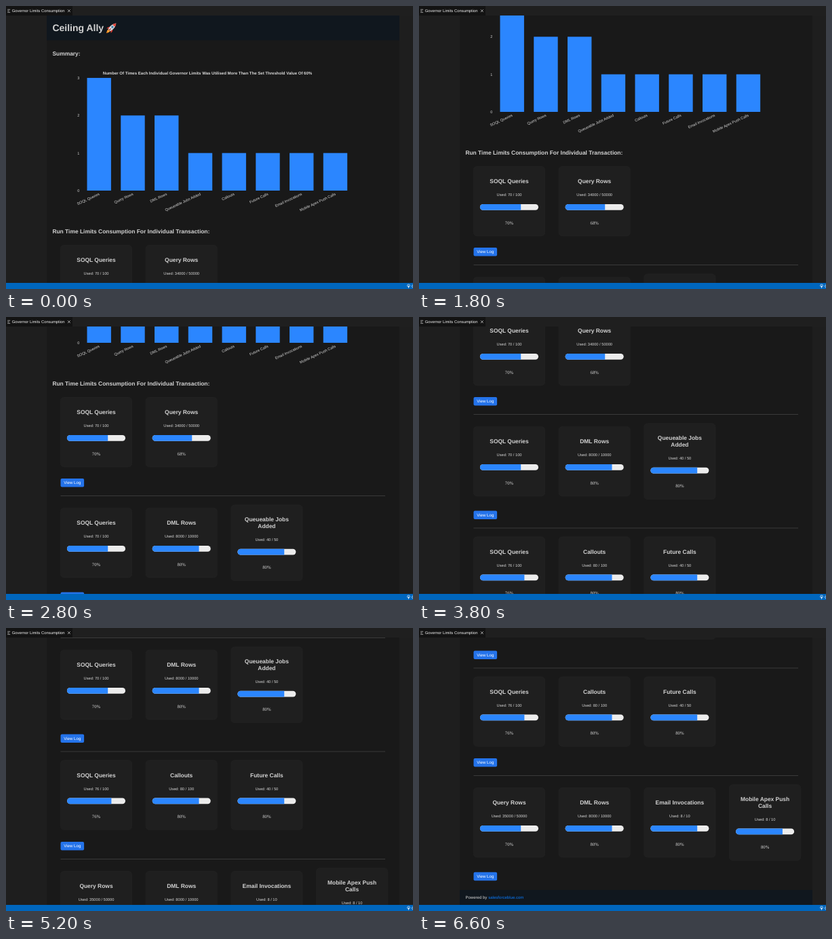
An HTML page for the animation above (6700 ms loop, 600x417 px).

```html
<!DOCTYPE html>
<html lang="en">
<head>
<meta charset="utf-8">
<title>Governor Limits Consumption</title>
<style>
  html, body { margin: 0; width: 100%; height: 100%; overflow: hidden; background: #1e1e1e; }
  svg { display: block; width: 600px; height: 417px; }
  text { font-family: "Liberation Sans", Arial, Helvetica, sans-serif; fill: #d8d8d8; text-rendering: geometricPrecision; }
  .h { font-weight: bold; font-size: 8.43px; fill: #d2d2d2; }
  .used { font-size: 5.68px; }
  .pct { font-family: "Liberation Serif", "Times New Roman", serif; font-size: 6.7px; }
  .tick { font-size: 5.5px; }
  .mid { text-anchor: middle; }
  .end { text-anchor: end; }
</style>
</head>
<body>
<svg id="stage" viewBox="0 0 600 417">
  <rect width="600" height="417" fill="#1e1e1e"/>
  <rect x="60" y="14" width="520" height="394" fill="#191919"/>
  <g id="page"></g>
  <g id="tabs">
    <rect width="600" height="14" fill="#1f1f1f"/>
    <rect width="98" height="14" fill="#131313"/>
    <path d="M2.2 5.2h4M2.2 7.3h2.6M2.2 9.4h4" stroke="#c4c4c4" stroke-width=".8"/>
    <text x="8.7" y="9.3" font-size="5.9" style="fill:#f2f2f2">Governor Limits Consumption</text>
    <path d="M91 5.2l3.8 3.8M94.800 5.2l-3.800 3.800" stroke="#dcdcdc" stroke-width=".7"/>
  </g>
  <g id="status" fill="none" stroke="#e4eefa" stroke-width=".7">
    <rect y="408" width="600" height="9" fill="#0066bd" stroke="none"/>
    <circle cx="593.5" cy="412" r="1.9"/>
    <path d="M593.500 412v3.500" stroke-width="1.100"/>
    <circle cx="600.300" cy="412.800" r="1.900"/>
  </g>
</svg>
<script>
const NS = "http://www.w3.org/2000/svg";
const BLUE = "#2b86ff", LOOP = 6700, STEP = 100;
const page = document.getElementById("page");

function add(tag, attrs, parent = page) {
  const el = document.createElementNS(NS, tag);
  for (const k in attrs) el.setAttribute(k, attrs[k]);
  parent.appendChild(el);
  return el;
}
const rect = (x, y, width, height, fill, more) =>
  add("rect", { x, y, width, height, fill, ...more });
const text = (str, x, y, cls, more) =>
  add("text", { x, y, class: cls, ...more }).textContent = str;

function rocket(x, y) {
  const g = add("g", { transform: `translate(${x} ${y}) rotate(45)` });
  const path = (d, fill) => add("path", { d, fill }, g);
  path("M-2 4Q-2.600 7.500 0 11Q2.600 7.500 2 4Z", "#f58a1f");
  path("M-1 4Q-1.200 6.500 0 8.500Q1.200 6.500 1 4Z", "#ffd65a");
  path("M-2.500 0Q-5 2-4.600 6L-2 4ZM2.500 0Q5 2 4.600 6L2 4Z", "#d8392f");
  path("M0-9.500Q3.600-5 2.900 1L2.100 4.600H-2.100L-2.900 1Q-3.600-5 0-9.500Z", "#d3dbe2");
  path("M0-9.500Q1.900-7.300 2.600-4.800Q0-4-2.600-4.800Q-1.900-7.300 0-9.500Z", "#e0483c");
  add("circle", { cx: 0, cy: -1.8, r: 1.5, fill: "#3d86b8", stroke: "#6b7a86", "stroke-width": .5 }, g);
  path("M-.6 1.500H.6V6H-.6Z", "#b92f28");
}

function chart() {
  text("Number Of Times Each Individual Governor Limits Was Utilised More Than The Set Threshold Value Of 60%",
    297, 100.6, "mid", { "font-weight": "bold", "font-size": 6.05 });
  const base = 272, unit = 55.35;
  for (let n = 0; n < 4; n++) text(n, 108.3, base + 2 - n * unit, "tick end");
  const bars = [["SOQL Queries", 3], ["Query Rows", 2], ["DML Rows", 2], ["Queueable Jobs Added", 1],
    ["Callouts", 1], ["Future Calls", 1], ["Email Invocations", 1], ["Mobile Apex Push Calls", 1]];
  bars.forEach(([name, n], i) => {
    const x = 119.5 + i * 49.75;
    rect(x, base - n * unit, 35.4, n * unit, BLUE);
    text(name, 0, 0, "tick end", { transform: `translate(${x + 18.7} 278.4) rotate(-25)` });
  });
}

function card(col, top, [name, used, total]) {
  const lines = name.split("|"), extra = (lines.length - 1) * 9.3;
  const x = 80.4 + col * 125.7, y = top - extra / 2, cx = x + 52.6;
  rect(x, y, 105.2, 102.3 + extra, "#1f1f1f", { rx: 5, stroke: "#252525", "stroke-width": .6 });
  lines.forEach((s, i) => text(s, cx, y + 24.5 + i * 9.6, "h mid"));
  const o = y + extra, share = used / total;
  text(`Used: ${used} / ${total}`, cx, o + 43.8, "used mid");
  rect(x + 9.6, o + 55.4, 86, 8.8, "#ececec", { rx: 4.4 });
  const w = 86 * share - 4.4;
  add("path", { d: `M${x + 14} ${o + 55.4}h${w}v8.8h${-w}a4.4 4.4 0 0 1 0-8.8z`, fill: BLUE });
  text(Math.round(share * 100) + "%", cx, o + 85.2, "pct mid");
}

function group(top, button, cards) {
  cards.forEach((c, i) => card(i, top, c));
  rect(80.5, button - 6.2, 34.6, 12.4, "#2473ea", { rx: 2 });
  text("View Log", 97.8, button + 2.2, "mid", { "font-size": 6.15, style: "fill:#fff" });
}

function build() {
  rect(60, 14, 520, 36.5, "#10171e");
  text("Ceiling Ally", 68.4, 37.3, "", { "font-weight": "bold", "font-size": 14, style: "fill:#d2d2d2" });
  rocket(155.6, 32.2);
  text("Summary:", 68.4, 73.4, "h");
  chart();
  text("Run Time Limits Consumption For Individual Transaction:", 68.4, 335, "h");
  const soql = ["SOQL Queries", 70, 100], dml = ["DML Rows", 8000, 10000];
  group(352.5, 478.2, [soql, ["Query Rows", 34000, 50000]]);
  group(515.6, 645.8, [soql, dml, ["Queueable Jobs|Added", 40, 50]]);
  group(678, 804.2, [["SOQL Queries", 76, 100], ["Callouts", 80, 100], ["Future Calls", 40, 50]]);
  group(841.5, 972, [["Query Rows", 35000, 50000], dml, ["Email Invocations", 8, 10],
    ["Mobile Apex Push|Calls", 8, 10]]);
  for (const y of [497.5, 665, 823.5]) rect(80.5, y - .4, 478.5, .8, "#434343");
  rect(60, 992, 520, 24, "#10171e");
  text("Powered by ", 68.4, 1005.2, "", { "font-size": 6.07 });
  text("salesforceblue.com", 102.2, 1005.2, "", { "font-size": 6.07, style: "fill:#0a7cff" });
}

// Scroll gestures as [time, offset], joined by a monotone cubic.
const keys = [[0, 0], [900, 74.5], [1300, 111], [1700, 111], [1800, 116], [2800, 234], [2900, 234],
  [3800, 354], [4100, 384], [4400, 384], [5200, 483], [5500, 512], [5900, 512], [6600, 606], [6700, 606]];
const rate = i => keys[i + 1] ? (keys[i + 1][1] - keys[i][1]) / (keys[i + 1][0] - keys[i][0]) : 0;
function slope(i) {
  const a = i ? rate(i - 1) : 0, b = rate(i);
  return a && b ? 2 * a * b / (a + b) : 0;
}
function scrollAt(t) {
  let i = 0;
  while (i < keys.length - 2 && t >= keys[i + 1][0]) i++;
  const [t0, a] = keys[i], [t1, b] = keys[i + 1], d = t1 - t0;
  const u = (t - t0) / d, v = 1 - u;
  return a * (1 + 2 * u) * v * v + b * u * u * (3 - 2 * u)
    + d * u * v * (slope(i) * v - slope(i + 1) * u);
}

function draw(t) {
  const tick = Math.floor((t % LOOP) / STEP) * STEP;
  page.setAttribute("transform", `translate(0 ${-scrollAt(tick).toFixed(2)})`);
}

build();
draw(0);
const start = performance.now();
function loop() {
  draw(Math.max(0, performance.now() - start));
  requestAnimationFrame(loop);
}
requestAnimationFrame(loop);
</script>
</body>
</html>
```
